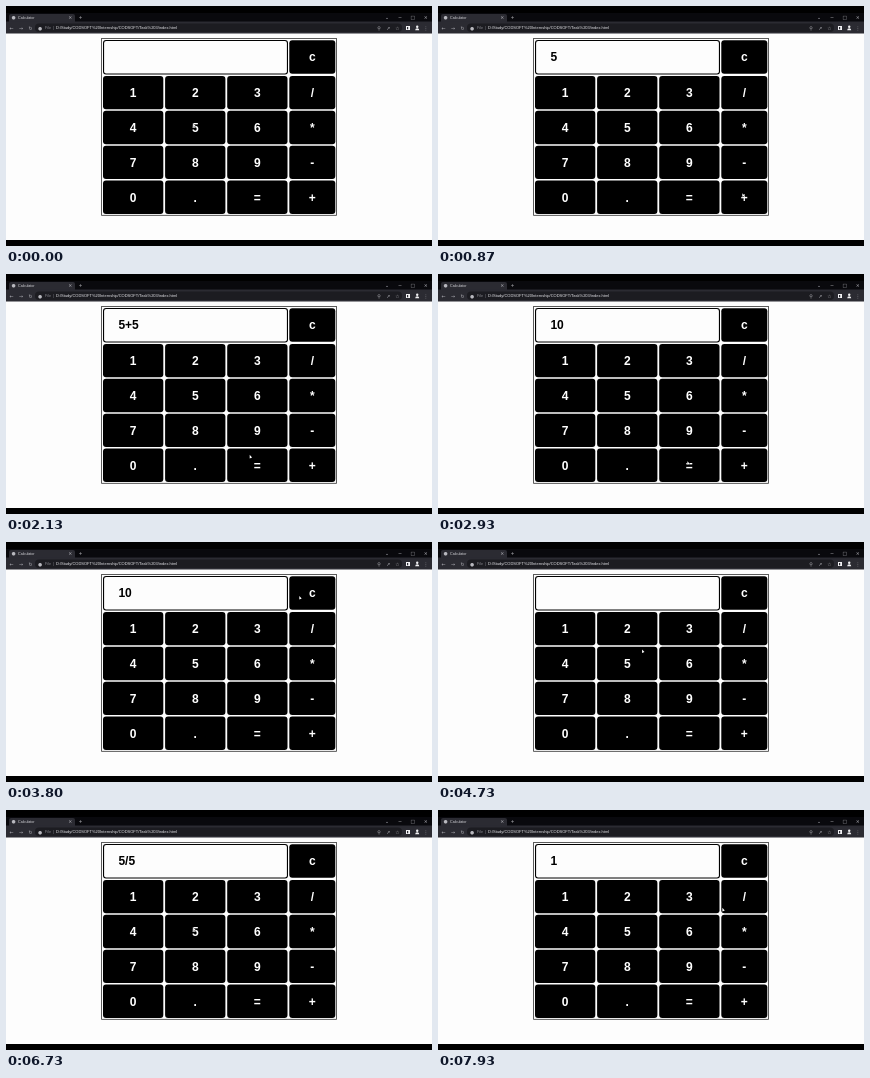
An HTML page with a canvas for the animation above (8000 ms loop, 426 by 240 pixels).

```html
<!DOCTYPE html>
<html lang="en">
<head>
<meta charset="utf-8">
<title>Calculator</title>
<style>
  html, body { margin: 0; width: 100%; height: 100%; overflow: hidden; background: #fdfdfd; }
  canvas { display: block; width: 426px; height: 240px; }
</style>
</head>
<body>
<canvas id="stage"></canvas>
<script>
const W = 426, H = 240, LOOP = 8000, STEP = 1000 / 15;
const HOLD = 150, MOVE = 450;
const FONT = '"Liberation Sans", Arial, sans-serif';
const ICONS = '"DejaVu Sans", sans-serif';
const PAGE = '#fdfdfd', BAR = '#2b2b32', GREY = '#b8b8be';
const keypad = ['   c', '123/', '456*', '789-', '0.=+'];

// The clicks drive both the display and the pointer
const presses = [
  { key: '5', time: 460 }, { key: '+', time: 980 }, { key: '5', time: 1640 },
  { key: '=', time: 2280 }, { key: 'c', time: 3950, dx: -13, dy: 3 },
  { key: '5', time: 4930 }, { key: '/', time: 5950 }, { key: '5', time: 6520 },
  { key: '=', time: 7320 }, { key: 'c', time: 8200 },
];

const canvas = document.getElementById('stage');
const ctx = canvas.getContext('2d');
const ratio = window.devicePixelRatio || 1;
canvas.width = W * ratio;
canvas.height = H * ratio;
ctx.scale(ratio, ratio);

function rect(x, y, w, h, color, radius = 0) {
  ctx.beginPath();
  ctx.roundRect(x, y, w, h, radius);
  ctx.fillStyle = color;
  ctx.fill();
}

function write(text, x, y, font, color, align = 'left') {
  ctx.font = font;
  ctx.textAlign = align;
  ctx.fillStyle = color;
  ctx.fillText(text, x, y);
}

function icons(glyphs, x, y, gap) {
  [...glyphs].forEach((glyph, i) =>
    write(glyph, x + i * gap, y, `4.8px ${ICONS}`, GREY, 'center'));
}

function drawBrowser() {
  rect(0, 0, W, 7, '#000');
  rect(0, 7, W, 9, '#09090d');
  rect(3, 8, 66, 8, BAR, [2, 2, 0, 0]);
  rect(0, 15.5, W, 12, BAR);
  rect(29, 17.5, 367, 8.5, '#1c1c21', 4);

  icons('●', 7.5, 13.2, 0);
  write('Calculator', 12, 13, `3.7px ${FONT}`, '#d8d8dc');
  icons('×+', 64.3, 13.2, 10.2);
  icons('⌄−□×', 381, 13.2, 12.9);

  icons('←→↻●', 5.5, 23.7, 9.5);
  write('File  |', 39, 23.3, `3.7px ${FONT}`, '#8e8e95');
  write('D:/Study/CODSOFT%20Internship/CODSOFT/Task%203/index.html',
    50, 23.4, `4px ${FONT}`, '#e6e6ea');
  icons('⚲↗☆', 373, 23.7, 9.2);
  rect(400, 20, 4, 4, '#f2f2f4');
  rect(401, 21, 1.2, 2.2, BAR);
  rect(410, 19.6, 2.4, 2.4, '#f2f2f4', 1.2);
  rect(409.2, 22.2, 4, 2, '#f2f2f4', [2, 2, 0, 0]);
  icons('⋮', 420, 23.7, 0);
}

function keyBox(row, col) {
  return {
    x: 97 + col * 62.1,
    y: row ? 35.1 + row * 34.85 : 34.3,
    w: col < 3 ? 60.3 : 46,
    h: 33.4,
  };
}

function drawCalculator(text) {
  ctx.lineWidth = 0.8;
  ctx.strokeStyle = '#333';
  ctx.strokeRect(95.6, 32.4, 234.8, 176.9);

  rect(97, 34, 185, 34.5, '#000', 3);
  rect(98.1, 35.1, 182.8, 32.3, PAGE, 2);
  write(text, 112.4, 55.4, `bold 12px ${FONT}`, '#000');

  keypad.forEach((labels, row) => [...labels].forEach((label, col) => {
    if (label === ' ') return;
    const { x, y, w, h } = keyBox(row, col);
    rect(x, y, w, h, '#000', 3);
    write(label, x + w / 2, y + 21.1, `bold 12px ${FONT}`, '#fff', 'center');
  }));
}

function evaluate(text) {
  const [a, operator, b] = text;
  return String(operator === '+' ? +a + +b : a / b);
}

function displayAt(t) {
  return presses.filter(({ time }) => time <= t).reduce((text, { key }) =>
    key === 'c' ? '' : key === '=' ? evaluate(text) : text + key, '');
}

function tipOver({ key, dx = -2, dy = -4 }) {
  const row = keypad.findIndex(labels => labels.includes(key));
  const { x, y, w, h } = keyBox(row, keypad[row].indexOf(key));
  return [x + w / 2 + dx, y + h / 2 + dy];
}

function pointerAt(t) {
  const next = presses.findIndex(({ time }) => time + HOLD > t);
  const target = presses[next], previous = presses[next - 1] || target;
  const arrive = target.time - HOLD;
  const leave = Math.max(arrive - MOVE, previous.time + HOLD);
  const p = Math.min(1, Math.max(0, (t - leave) / (arrive - leave)));
  const ease = p * p * (3 - 2 * p);
  const [x0, y0] = tipOver(previous), [x1, y1] = tipOver(target);
  return [x0 + (x1 - x0) * ease, y0 + (y1 - y0) * ease];
}

function drawPointer([x, y]) {
  ctx.beginPath();
  ctx.moveTo(x, y);
  ctx.lineTo(x, y + 3.6);
  ctx.lineTo(x + 2.4, y + 2.6);
  ctx.closePath();
  ctx.strokeStyle = '#000';
  ctx.lineWidth = 0.6;
  ctx.stroke();
  ctx.fillStyle = '#fff';
  ctx.fill();
}

function draw(now) {
  const t = Math.floor((now % LOOP) / STEP) * STEP;
  rect(0, 0, W, H, PAGE);
  drawBrowser();
  drawCalculator(displayAt(t));
  drawPointer(pointerAt(t));
  rect(0, 234, W, 6, '#000');
  requestAnimationFrame(draw);
}
draw(0);
</script>
</body>
</html>
```
